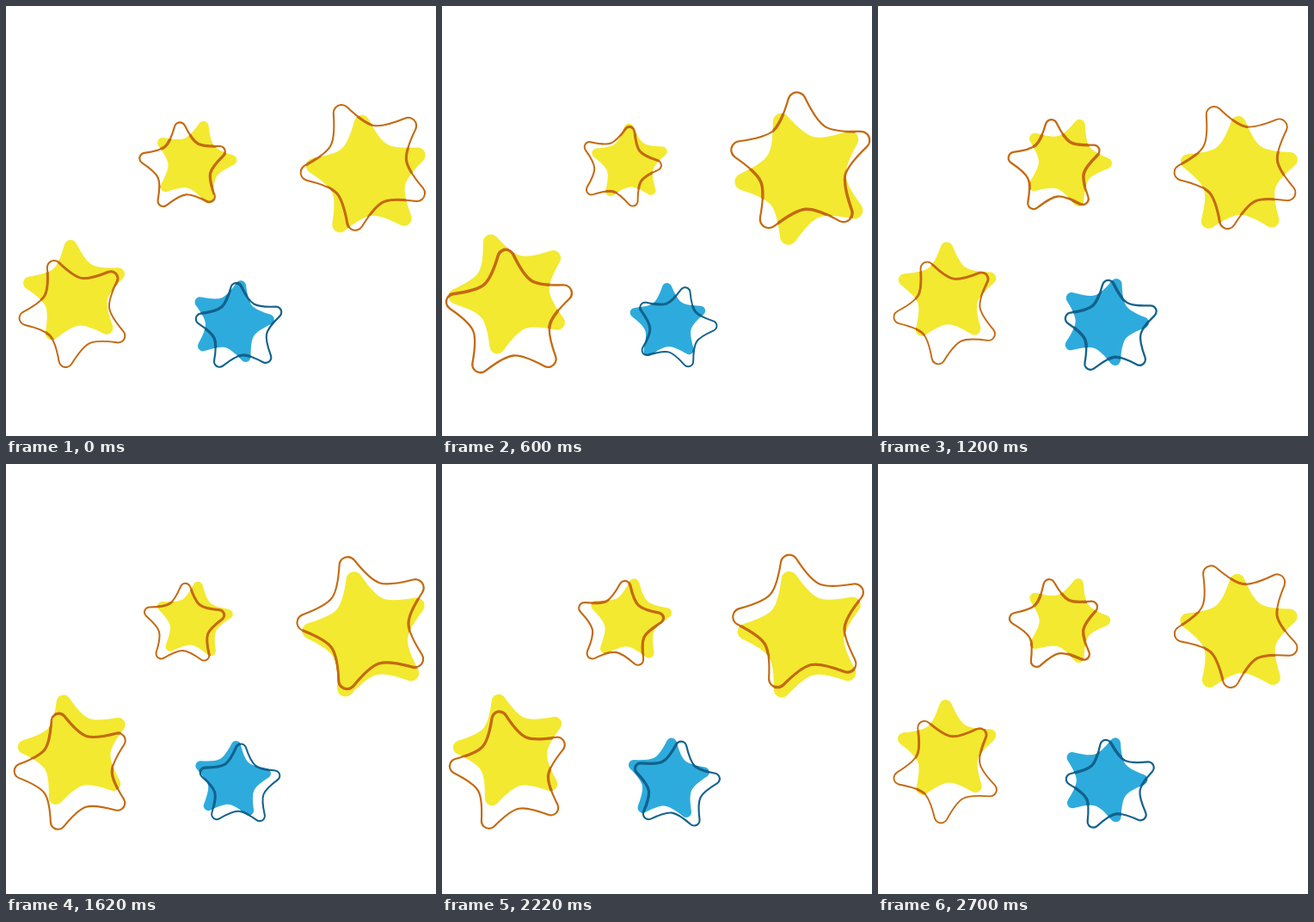
Recreate the animation shown at these times as an HTML page with a canvas. Size 500 px wide and 500 px high, loop 2.76 s.

```html
<!DOCTYPE html>
<html lang="en">
<head>
<meta charset="utf-8">
<title>Wobbling stars</title>
<style>
  html, body { margin: 0; width: 100%; height: 100%; overflow: hidden; background: #fff; }
  canvas { display: block; width: 500px; height: 500px; }
</style>
</head>
<body>
<canvas id="stage" width="500" height="500"></canvas>
<script>
const ctx = document.getElementById('stage').getContext('2d');
const LOOP = 2760, STEP = 60, PERIOD = 1400, FILL_RATIO = 0.95;
const RAD = Math.PI / 180;

const YELLOW = { fill: '#f3e930', line: '#c46a12' };
const BLUE = { fill: '#2eabdd', line: '#12628c' };

// fill and line are offsets from the anchor; swing is the relative size change
const stars = [
  { x: 420, y: 192, fill: [0.3, 7.5], line: [-1.3, -7], r: 79.7, turn: 0, swing: 0.07, peak: 540, color: YELLOW },
  { x: 84, y: 334, fill: [-3.5, -0.3], line: [-4, 23.3], r: 69.7, turn: 0, swing: 0.118, peak: 540, color: YELLOW },
  { x: 212.8, y: 185, fill: [6, -2.7], line: [-6.3, 2.3], r: 51, turn: 20, swing: -0.115, peak: 420, color: YELLOW },
  { x: 267, y: 371, fill: [-4.5, -3.4], line: [4.7, 3], r: 51, turn: 20, swing: -0.115, peak: 420, color: BLUE }
];

// Triangle wave: 1 at the peak, -1 half a period later
function triangle(t, peak) {
  const phase = (((t - peak) % PERIOD) + PERIOD) % PERIOD / PERIOD;
  return Math.abs(phase - 0.5) * 4 - 1;
}

function starPath(cx, cy, r, degrees) {
  const path = new Path2D();
  const tip = 0.122, lean = 21 * RAD, notch = 0.615;
  for (let i = 0; i < 5; i++) {
    const a = (degrees + 72 * i) * RAD, cos = Math.cos(a), sin = Math.sin(a);
    const at = (x, y) => [cx + r * (x * cos - y * sin), cy + r * (x * sin + y * cos)];
    const sx = tip * Math.cos(lean), sy = tip - 1 - tip * Math.sin(lean);
    const nx = notch * Math.sin(36 * RAD), ny = -notch * Math.cos(36 * RAD);
    const fx = sx + 0.24 * Math.sin(lean), fy = sy + 0.24 * Math.cos(lean);
    const gx = nx - 0.1 * Math.cos(36 * RAD), gy = ny - 0.1 * Math.sin(36 * RAD);
    if (i === 0) path.moveTo(...at(-nx, ny));
    path.bezierCurveTo(...at(-gx, gy), ...at(-fx, fy), ...at(-sx, sy));
    path.arc(...at(0, tip - 1), r * tip, a - Math.PI + lean, a - lean);
    path.bezierCurveTo(...at(fx, fy), ...at(gx, gy), ...at(nx, ny));
  }
  path.closePath();
  return path;
}

function drawStar(star, t) {
  const s = 1 + star.swing * triangle(t, star.peak);
  const place = ([dx, dy], r, angle) => starPath(star.x + dx * s, star.y + dy * s, r * s, star.turn + angle);
  const body = place(star.fill, star.r * FILL_RATIO, -12 - 12 * triangle(t, 530));
  const outline = place(star.line, star.r, -16.6 + 12 * triangle(t, 600));

  ctx.fillStyle = star.color.fill;
  ctx.strokeStyle = star.color.line;
  ctx.fill(body);
  ctx.lineWidth = 2.1 * s;
  ctx.stroke(outline);

  // The outline is heavier where it crosses the body
  ctx.save();
  ctx.clip(body);
  ctx.lineWidth = 3.2 * s;
  ctx.stroke(outline);
  ctx.restore();
}

function render() {
  const t = Math.floor(performance.now() % LOOP / STEP) * STEP;
  ctx.fillStyle = '#fff';
  ctx.fillRect(0, 0, 500, 500);
  stars.forEach(star => drawStar(star, t));
  requestAnimationFrame(render);
}
render();
</script>
</body>
</html>
```
